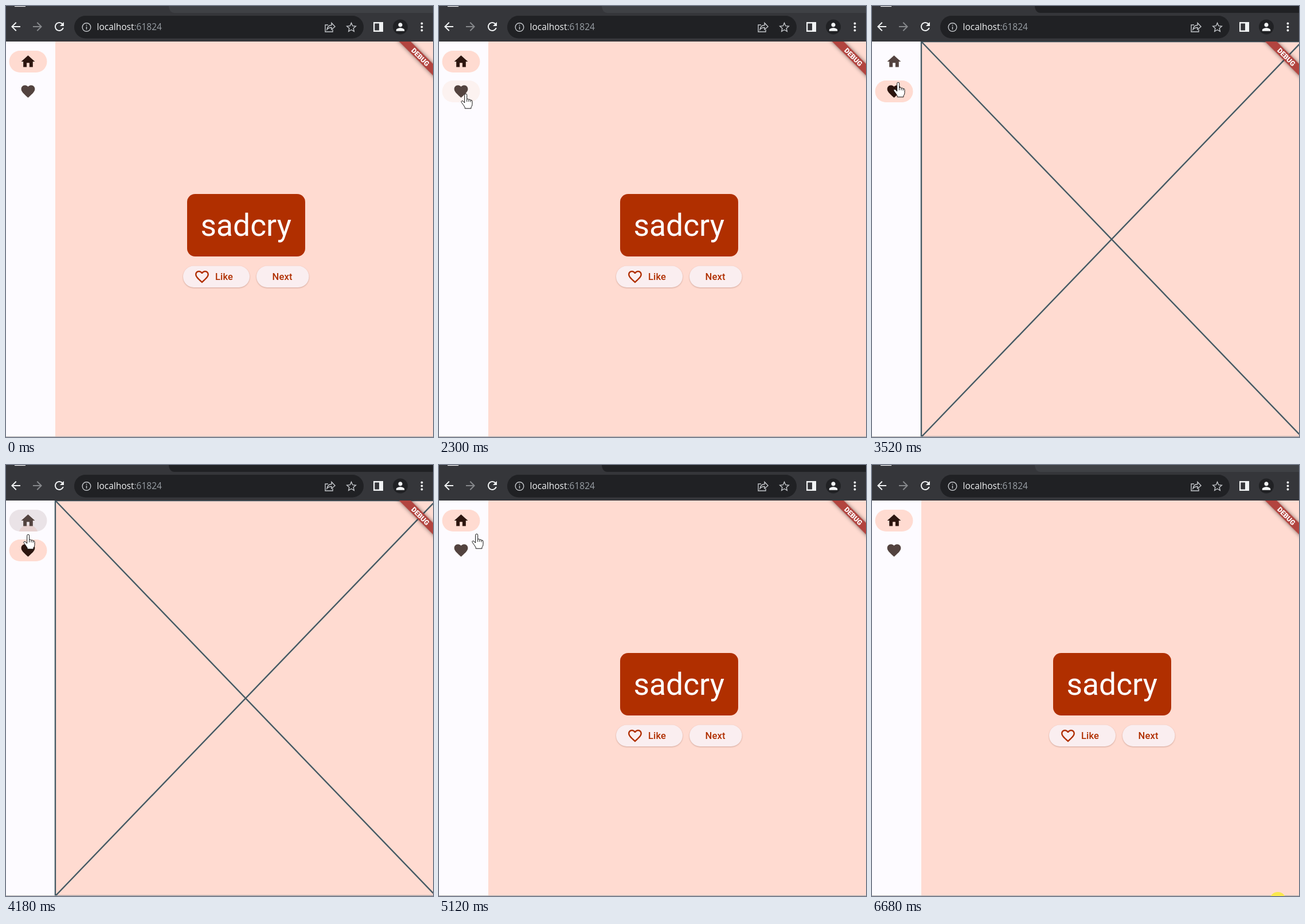
Write an HTML page that moves like this. It is 745 by 752 pixels and loops after 6.74 s.

```html
<!DOCTYPE html>
<html lang="en">
<head>
<meta charset="utf-8">
<title>Word app</title>
<style>
html, body { margin: 0; width: 100%; height: 100%; overflow: hidden; background: #fffbff; }
svg { display: block; width: 745px; height: 752px; }
text { font-family: Roboto, sans-serif; }
.btn rect { fill: #faeef0; filter: drop-shadow(0 1.2px 1px rgba(90, 30, 10, .28)); }
.btn text { font-size: 16.6px; font-weight: 500; letter-spacing: .12px; fill: #b02f00; }
.line { fill: none; stroke: #c4c7cb; stroke-width: 1.4; }
</style>
</head>
<body>
<svg viewBox="0 0 745 752">
  <defs>
    <path id="back" d="M20 11H7.83l5.59-5.59L12 4l-8 8 8 8 1.41-1.41L7.83 13H20z"/>
    <clipPath id="homeClip"><rect x="5.5" y="78" width="66" height="38" rx="19"/></clipPath>
    <clipPath id="heartClip"><rect x="5.5" y="130" width="66" height="38" rx="19"/></clipPath>
  </defs>

  <rect width="86" height="752" fill="#fdfbff"/>
  <rect x="86" width="659" height="752" fill="#ffdbd1"/>

  <g clip-path="url(#homeClip)">
    <rect id="homeHover" y="78" width="86" height="38"/>
    <rect id="homePill" y="78" width="86" height="38" fill="#ffdbd1"/>
    <circle id="homeInk" cx="39" cy="121" fill="#e0a090"/>
  </g>
  <g clip-path="url(#heartClip)">
    <rect id="heartHover" y="130" width="86" height="38" fill="#fcf2f0"/>
    <rect id="heartPill" y="130" width="86" height="38" fill="#ffdbd1"/>
    <circle id="heartInk" cx="49" cy="154" fill="#e0a090"/>
  </g>
  <path id="home" transform="translate(24.2 82.7) scale(1.19)" d="M10 20v-6h4v6h5v-8h3L12 3 2 12h3v8z"/>
  <path id="heart" transform="translate(24.2 134.7) scale(1.19)" d="M12 21.35l-1.45-1.32C5.4 15.36 2 12.28 2 8.5 2 5.42 4.42 3 7.5 3c1.74 0 3.41.81 4.5 2.09C13.09 3.81 14.76 3 16.5 3 19.58 3 22 5.42 22 8.5c0 3.78-3.4 6.86-8.55 11.54z"/>

  <g id="words">
    <rect x="316" y="328" width="206" height="109" rx="14" fill="#b02f00"/>
    <text x="418.7" y="401" font-size="53.4" fill="#fff" text-anchor="middle">sadcry</text>
    <g class="btn">
      <rect id="like" x="309" y="453.5" width="116" height="37.5" rx="18.7"/>
      <path transform="translate(327.7 458.2) scale(1.19)" fill="#b02f00" d="M16.5 3c-1.74 0-3.41.81-4.5 2.09C10.91 3.81 9.24 3 7.5 3 4.42 3 2 5.42 2 8.5c0 3.78 3.4 6.86 8.55 11.54L12 21.35l1.45-1.32C18.6 15.36 22 12.28 22 8.5 22 5.42 19.58 3 16.5 3zm-4.4 15.55l-.1.1-.1-.1C7.14 14.24 4 11.39 4 8.5 4 6.5 5.5 5 7.5 5c1.54 0 3.04.99 3.57 2.36h1.87C13.46 5.99 14.96 5 16.5 5c2 0 3.5 1.5 3.5 3.5 0 2.89-3.14 5.74-7.9 10.05z"/>
      <text x="365" y="478">Like</text>
    </g>
    <g class="btn">
      <rect x="437" y="453.5" width="91.5" height="37.5" rx="18.7"/>
      <text x="464.5" y="478">Next</text>
    </g>
  </g>
  <path id="empty" d="M86 62H750V752H86ZL750 752M750 62L86 752" fill="none" stroke="#455a64" stroke-width="2.4"/>

  <g transform="translate(723 89) rotate(45)">
    <rect x="-60" y="-7.2" width="120" height="14.4" fill="#b2443f" style="filter: drop-shadow(0 0 3.5px rgba(0, 0, 0, .5))"/>
    <text y="4.3" font-size="12.1" font-weight="900" fill="#fff" text-anchor="middle">DEBUG</text>
  </g>

  <rect width="745" height="62" fill="#35363a"/>
  <path id="strip" d="M284 0H745V12H294Q285 12 284 0Z"/>
  <rect x="15" width="19" height="1.2" fill="#fff"/>
  <rect x="119" y="17" width="505" height="39.5" rx="19.7" fill="#202124"/>
  <use href="#back" x="5" y="24" fill="#f1f3f4"/>
  <use href="#back" transform="translate(67 24) scale(-1 1)" fill="#86888b"/>
  <path transform="translate(81 24)" fill="#f1f3f4" d="M17.65 6.35C16.2 4.9 14.21 4 12 4c-4.42 0-7.99 3.58-7.99 8s3.57 8 7.99 8c3.73 0 6.84-2.55 7.73-6h-2.08c-.82 2.33-3.04 4-5.65 4-3.31 0-6-2.69-6-6s2.69-6 6-6c1.66 0 3.14.69 4.22 1.78L13 11h7V4z"/>
  <circle class="line" cx="140.5" cy="37" r="7.3"/>
  <path class="line" d="M140.5 36V41M140.5 32.8V34.5"/>
  <text x="158.5" y="42" font-size="15.5" fill="#f1f3f4" style="font-family: 'Open Sans', sans-serif">localhost<tspan fill="#9aa0a6">:61824</tspan></text>
  <path class="line" d="M562 33H557V45H570V41M560 41C561 35 565 33.5 568 33.5V29.5L574 36 568 41V37.5C565 37.5 562.5 38 560 41Z"/>
  <path class="line" d="M602.5 29.5L604.7 34.7 610.3 35.2 606.1 38.9 607.3 44.4 602.5 41.5 597.7 44.4 598.9 38.9 594.7 35.2 600.3 34.7Z"/>
  <path d="M641 28H658V45H641ZM643.3 30.5V42.5H651V30.5Z" fill="#f1f3f4" fill-rule="evenodd"/>
  <circle cx="688" cy="36.5" r="13" fill="#202124"/>
  <path transform="translate(677.2 25.7) scale(.9)" fill="#f1f3f4" d="M12 12c2.21 0 4-1.79 4-4s-1.79-4-4-4-4 1.79-4 4 1.79 4 4 4zm0 2c-2.67 0-8 1.34-8 4v2h16v-2c0-2.66-5.33-4-8-4z"/>
  <path d="M725.5 30.5v0M725.5 36.5v0M725.5 42.5v0" stroke="#f1f3f4" stroke-width="4" stroke-linecap="round"/>
  <rect y="751" width="745" height="1" fill="#aeaaac"/>
  <circle id="glow" cx="708" cy="759" r="14" fill="#fae84e"/>

  <g id="cursor" fill="#fff" stroke="#111" stroke-linejoin="round">
    <path id="arrow" d="M.5 .5V18.5L4.5 14.8 7.2 21.2 10.2 20 7.5 13.6H13.3Z"/>
    <path id="hand" d="M-2.3 16V2.3a2 2 0 0 1 4 0V9.5q2-1.2 3.3.8 2-1 3.2.9 2.8-.6 2.8 2.3v5q0 3-2 5v2.3H-1.8v-2Q-4 20-7.5 15.5q-1.5-2 .3-3 2-1 4.9 3.5zM1.7 9.5V14M5 10.3V14M8.2 11.2V14.5"/>
  </g>
</svg>
<script>
const LOOP = 6740, TICK = 67;
const $ = id => document.getElementById(id);
const set = (id, attrs) => { for (const k in attrs) $(id).setAttribute(k, attrs[k]); };
const show = (id, on) => set(id, { visibility: on ? 'visible' : 'hidden' });

// time, x, y of the pointer tip
const path = [
  [780, 626, 703], [850, 471, 550], [920, 360, 441], [990, 293, 376], [1060, 271, 354],
  [1170, 271, 354], [1440, 154, 227], [1900, 71, 181], [2100, 28, 139], [2160, 47, 153],
  [3395, 48, 153], [3600, 41, 92], [3790, 39, 121], [5050, 39, 121], [5120, 66, 120],
  [5410, 567, 453], [5600, 567, 453], [5940, 712, 615], [6280, 712, 765]
];

function progress(t, a, b) {
  const n = Math.max(1, Math.round((b - a) / TICK));
  return Math.max(0, Math.min(1, Math.floor(n * (t - a) / (b - a) + 1e-6) / n));
}

function pointer(t) {
  let i = path.findIndex(p => p[0] > t);
  if (i < 0) i = path.length - 1;
  const [a, x, y] = path[Math.max(0, i - 1)], [b, x2, y2] = path[i];
  const k = b > a ? progress(t, a, b) : 0;
  return [x + (x2 - x) * k, y + (y2 - y) * k];
}

function ink(id, t, start, speed, end) {
  const age = Math.floor((t - start) / 60) * 60 + 20;
  set(id, { r: t >= start && t < end ? age * speed : 0, opacity: .25 });
}

function draw(t) {
  const favorites = t >= 2560 && t < 4250;
  const away = progress(t, 2500, 2760), back = progress(t, 4180, 4380);
  const pressed = t >= 4050 && t < 4380;

  show('words', !favorites);
  show('empty', favorites);
  set('strip', { fill: t >= 2450 && t < 6610 ? '#202124' : '#3f4145' });
  set('like', { style: t >= 990 && t < 1310 ? 'fill:#f6e5e4' : '' });

  set('homePill', { opacity: t < 4180 ? 1 - away : back });
  set('heartPill', { opacity: t < 4180 ? away : 1 - back });
  show('homeHover', t >= 3600 && t < 4380);
  set('homeHover', { fill: pressed ? '#eae3e7' : '#fcf2f0' });
  show('heartHover', t >= 2300 && t < 3600);
  ink('heartInk', t, 2450, .18, 2700);
  ink('homeInk', t, 4050, .12, 4380);
  set('home', { fill: favorites ? '#53433f' : '#2c150f' });
  set('heart', { fill: favorites ? '#2c150f' : '#53433f' });

  const hand = t >= 2300 && t < 5190;
  const [x, y] = pointer(t);
  set('cursor', { transform: `translate(${Math.round(x)} ${Math.round(y)})` });
  show('arrow', !hand && t >= 780 && t < 6280);
  show('hand', hand);
  show('glow', t >= 6610);
}

const begin = performance.now();
function frame() {
  draw((performance.now() - begin) % LOOP);
  requestAnimationFrame(frame);
}
frame();
</script>
</body>
</html>
```
